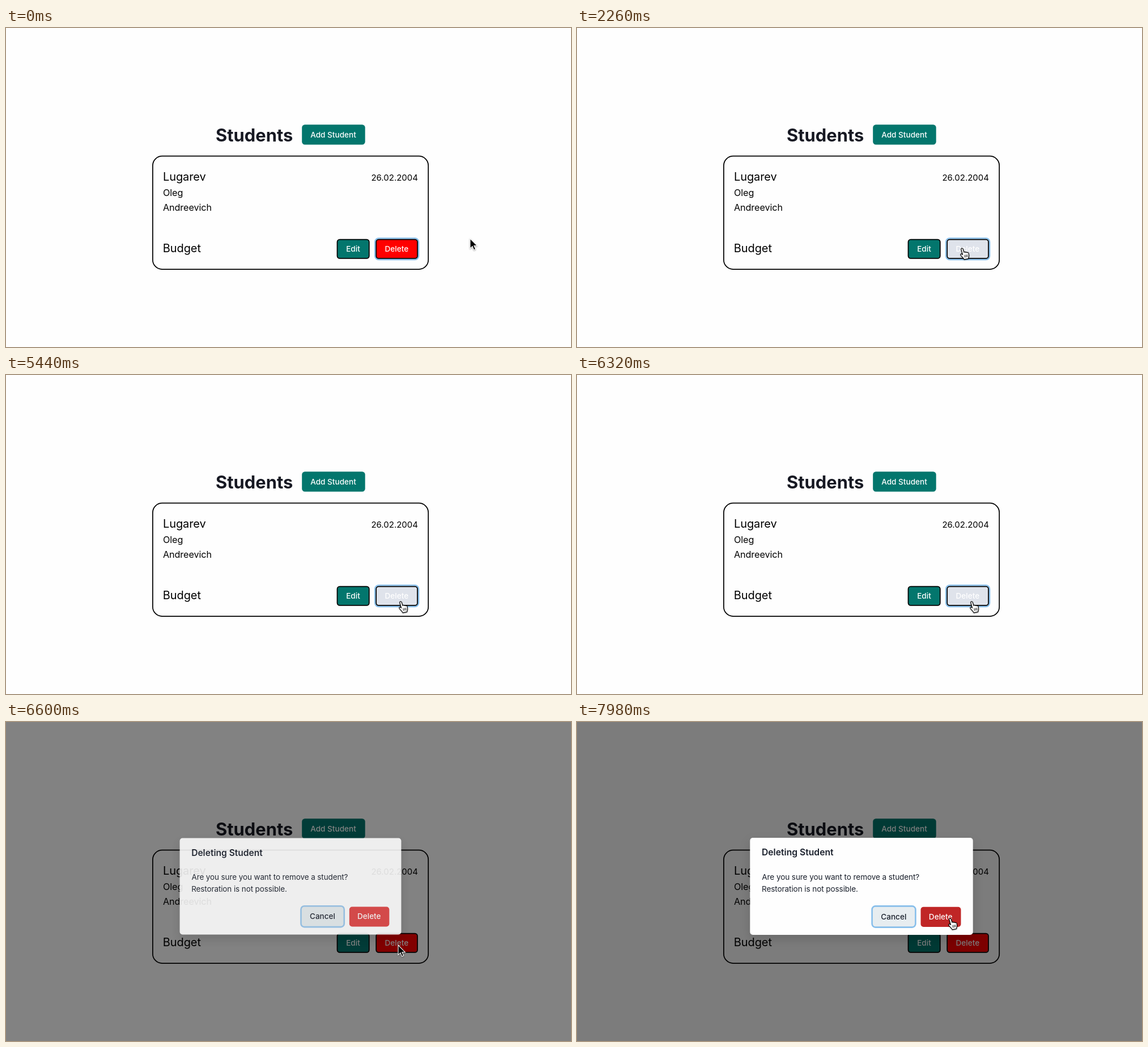
Write an HTML page that moves like this. It is 997 px wide and 562 px high and loops after 8 s.

```html
<!DOCTYPE html>
<html lang="en">
<head>
<meta charset="utf-8">
<title>Students</title>
<style>
  html, body { margin: 0; width: 100%; height: 100%; overflow: hidden; background: #fefefe; }
  svg { display: block; width: 100vw; height: 100vh; }
  text { font-family: Inter, Roboto, sans-serif; font-optical-sizing: none; fill: #000; }
  .heading { font-size: 30.9px; font-weight: 700; fill: #171923; }
  .large { font-size: 20px; letter-spacing: -.1px; }
  .name { font-size: 16.2px; letter-spacing: -.1px; }
  .date { font-size: 15px; text-anchor: end; }
  .label { font-size: 13.6px; font-weight: 550; text-anchor: middle; fill: #fff; }
  .title { font-size: 15.7px; font-weight: 600; fill: #1a202c; }
  .body { font-size: 13.6px; letter-spacing: -.11px; fill: #1a202c; }
  .dark { fill: #1a202c; }
  .ring { fill: none; stroke: #4299e1; stroke-opacity: .62; stroke-width: 2.6; }
  .outlined { stroke: #000; stroke-width: 1.75; }
  #dialog > rect:first-child { filter: drop-shadow(0 8px 9px rgba(0, 0, 0, .14)); }
  #arrow { filter: drop-shadow(0 1.5px 1.2px rgba(0, 0, 0, .4)); }
  #hand { filter: drop-shadow(0 1px 1px rgba(0, 0, 0, .3)); }
</style>
</head>
<body>
<svg viewBox="0 0 997 562">
  <rect width="997" height="562" fill="#fefefe"/>
  <text class="heading" x="370" y="200">Students</text>
  <rect x="522.2" y="170.3" width="111.5" height="35.1" rx="5.2" fill="#03766d"/>
  <text class="label" x="577.5" y="193">Add Student</text>

  <rect class="outlined" x="258.9" y="225.7" width="486.3" height="199.4" rx="16.7" fill="none"/>
  <text class="large" x="277" y="268.5">Lugarev</text>
  <text class="name" x="277" y="295.5">Oleg</text>
  <text class="name" x="277" y="322">Andreevich</text>
  <text class="date" x="727" y="268.5">26.02.2004</text>
  <text class="large" x="276.8" y="395">Budget</text>
  <rect class="outlined" x="584.5" y="372.5" width="56.3" height="33.3" rx="4.4" fill="#03766d"/>
  <text class="label" x="612.5" y="394.3">Edit</text>
  <rect id="cardRing" class="ring" x="651.2" y="370.5" width="76.8" height="37.4" rx="6.5"/>
  <rect id="cardDelete" class="outlined" x="653.2" y="372.5" width="72.8" height="33.3" rx="4.4"/>
  <text class="label" x="689.3" y="394.3">Delete</text>

  <rect id="shade" width="997" height="562"/>
  <g id="dialog">
    <rect x="305.3" y="204" width="393.4" height="171" rx="5" fill="#fefefe"/>
    <text class="title" x="326" y="235.3">Deleting Student</text>
    <text class="body" x="326.3" y="278">Are you sure you want to remove a student?</text>
    <text class="body" x="326" y="299">Restoration is not possible.</text>
    <rect x="521.5" y="325.3" width="75" height="35.4" rx="5" fill="#e7edf0"/>
    <rect id="cancelRing" class="ring" x="520.6" y="324.4" width="76.8" height="37.2" rx="6"/>
    <text class="label dark" x="558.8" y="347.8">Cancel</text>
    <rect id="dialogDelete" x="606.5" y="325.7" width="71" height="35.3" rx="5"/>
    <text class="label" x="641.7" y="347.8">Delete</text>
  </g>

  <g id="cursor">
    <path id="arrow" d="M0 0V17.3L4 13.6L6.7 20L9.6 18.8L6.9 12.6H12.4Z" fill="#000" stroke="#fff" stroke-width="1.1"/>
    <g id="hand" stroke="#000" stroke-width="1.2" stroke-linejoin="round" stroke-linecap="round">
      <path fill="#fff" d="M2.9 8.2C2.4 5.9 5.4 5.2 6.1 7.2L8 13.3C8.4 11.9 10.5 12.1 10.8 13.5C11.3 12.4 13.1 12.6 13.5 13.9C14.1 13 15.8 13.4 16.1 14.9L16.6 18.7C16.8 20.8 15.8 22.3 15.6 24.4L8.2 25.9C7.7 23.6 3.6 20.9 2.2 18.2C1.3 16.2 3.2 15.2 4.6 16.5L5.5 17.4Z"/>
      <path fill="none" stroke-width=".9" d="M8.9 18.2L9.6 22M11.3 17.8L11.9 21.6M13.6 17.5L14.1 21.2"/>
    </g>
  </g>
</svg>
<script>
const LOOP = 8000;
const part = Object.fromEntries([...document.querySelectorAll('[id]')].map(e => [e.id, e]));

// Keyframes: [time, value, ...]
const route = [
  [20, 819, 371], [820, 722, 380], [1140, 670, 378.5], [1380, 668, 379],
  [1520, 668, 379], [1900, 688, 394], [2260, 675, 382], [2360, 675, 382],
  [2540, 699, 396], [2660, 687, 396], [2800, 687, 396], [2960, 692, 393],
  [6840, 692, 393], [7580, 654, 340]
];
const dialogIn = [[6400, 0], [6440, .5], [6600, .87], [6700, .87], [6740, 1]];
const shadeIn = [[6380, 0], [6440, .63], [6600, .96], [6740, 1]];
const cancelRingIn = [[6440, 0], [6600, .85], [6740, 1]];

const HOVER_ON = 800, CLICK = 6380, ARROW_BACK = 6420, CONFIRM_HOVER = 7260;

const clamp = x => Math.min(1, Math.max(0, x));
const smooth = x => x * x * (3 - 2 * x);
const linear = x => x;

function track(keys, t, ease = linear) {
  let i = 0;
  while (i < keys.length - 2 && t > keys[i + 1][0]) i++;
  const [t0, ...a] = keys[i], [t1, ...b] = keys[i + 1];
  const k = ease(clamp((t - t0) / (t1 - t0)));
  return a.map((v, j) => v + (b[j] - v) * k);
}

// 200 ms colour change that starts fast and settles
const shift = (t, start) => 1 - (1 - clamp((t - start) / 200)) ** 2;
const mix = (a, b, k) => `rgb(${a.map((v, i) => Math.round(v + (b[i] - v) * k))})`;

function draw(t) {
  const hover = shift(t, HOVER_ON) - shift(t, CLICK);
  part.cardDelete.setAttribute('fill', mix([255, 0, 0], [223, 227, 235], hover));
  part.cardRing.setAttribute('opacity', 1 - shift(t, CLICK));

  part.shade.setAttribute('opacity', .51 * track(shadeIn, t)[0]);
  const [shown] = track(dialogIn, t);
  const scale = .95 + .05 * shown;
  part.dialog.setAttribute('opacity', shown);
  part.dialog.setAttribute('transform', `translate(502 289.6) scale(${scale}) translate(-502 -289.6)`);
  part.cancelRing.setAttribute('opacity', track(cancelRingIn, t)[0]);
  part.dialogDelete.setAttribute('fill', mix([224, 66, 66], [192, 38, 38], shift(t, CONFIRM_HOVER)));

  const [x, y] = track(route, t, smooth);
  const pointing = (t >= HOVER_ON && t < ARROW_BACK) || t >= CONFIRM_HOVER;
  part.cursor.setAttribute('transform', `translate(${x} ${y})`);
  part.arrow.setAttribute('visibility', pointing ? 'hidden' : 'visible');
  part.hand.setAttribute('visibility', pointing ? 'visible' : 'hidden');
}

function tick() {
  draw(performance.now() % LOOP);
  requestAnimationFrame(tick);
}
tick();
</script>
</body>
</html>
```
